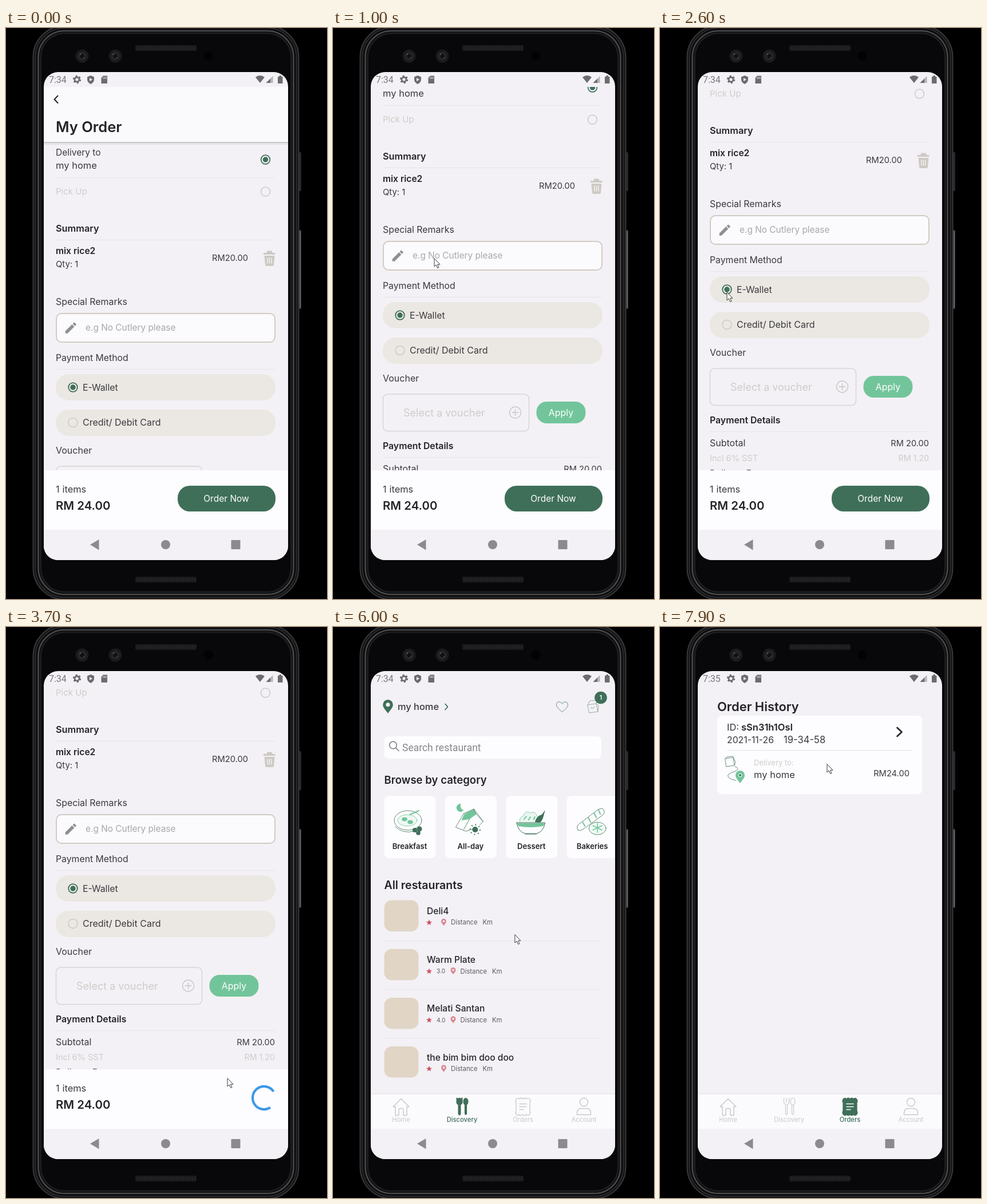
An HTML page for the animation above (8 s loop, 561 px wide and 998 px high).

```html
<!DOCTYPE html>
<html lang="en">
<head>
<meta charset="utf-8">
<title>Food order</title>
<style>
html, body { margin: 0; width: 100%; height: 100%; overflow: hidden; background: #000; }
svg { display: block; width: 561px; height: 998px; }
text { font-family: Inter, "Open Sans", sans-serif; white-space: pre; }
.rb { font-family: Roboto, sans-serif; }
</style>
</head>
<body>
<svg id="stage" viewBox="0 0 561 998" xmlns="http://www.w3.org/2000/svg"></svg>
<script>
const GREEN = '#3f6f59', MINT = '#72c59b', INK = '#3b393f', DARK = '#242328';
const PALE = '#cfccca', BG = '#f3f1f5', CARD = '#fdfcfe', GREY = '#6c6b6e';

// Text is placed by the middle of its capitals.
const text = (x, cy, str, size, { w = 400, c = INK, a = 'start', k = '' } = {}) =>
  `<text x="${x}" y="${(cy + size * .345).toFixed(1)}" font-size="${size}" font-weight="${w}" fill="${c}" text-anchor="${a}" class="${k}">${str}</text>`;
const rect = (x, y, w, h, r, fill, more = '') =>
  `<rect x="${x}" y="${y}" width="${w}" height="${h}" rx="${r}" fill="${fill}" ${more}/>`;
const circle = (x, y, r, fill, more = '') => `<circle cx="${x}" cy="${y}" r="${r}" fill="${fill}" ${more}/>`;
const oval = (x, y, rx, ry, fill, more = '') => `<ellipse cx="${x}" cy="${y}" rx="${rx}" ry="${ry}" fill="${fill}" ${more}/>`;
const path = (d, fill, more = '') => `<path d="${d}" fill="${fill}" ${more}/>`;
const pen = (color, width = 1) =>
  `stroke="${color}" stroke-width="${width}" stroke-linecap="round" stroke-linejoin="round"`;
const line = (x1, x2, y) => rect(x1, y, x2 - x1, 1, 0, '#e6e4e8');
const at = (x, y, inner, s = 1) => `<g transform="translate(${x} ${y}) scale(${s})">${inner}</g>`;

const radio = (x, y, on) => on
  ? circle(x, y, 7.8, 'none', pen(GREEN, 1.8)) + circle(x, y, 4.7, GREEN)
  : circle(x, y, 8, 'none', pen('#cbc8c8', 1.5));
const pin = (x, y, s, color, hole = BG) =>
  at(x, y, path('M0 11C-4 5-8 2-8-3A8 8 0 0 1 8-3C8 2 4 5 0 11Z', color) + circle(0, -3, 3.2, hole), s);

function phone() {
  const dots = (y) => rect(226, y, 107, 10, 2, '#1b1b1d') +
    `<path d="M229 ${y + 5}H331" stroke="#242426" stroke-width="5" stroke-dasharray="2 2"/>`;
  const lens = (x) => circle(x, 49, 11.5, '#1b1b1d') + circle(x, 49, 7, '#29292c') +
    circle(x, 49, 4, '#111') + circle(x - 3, 46, 1.3, '#55565a') + circle(x + 3, 52, 1, '#47484b');
  const ring = (inset, fill, color, width) =>
    rect(46.5 + inset, inset - 5, 466 - inset * 2, 1005 - inset * 2, 56 - inset, fill, pen(color, width));
  return rect(511, 217, 5, 68, 1.5, '#29292b') + rect(511, 353, 5, 138, 1.5, '#3a3a3c') +
    rect(513.5, 355, 1.2, 134, 0, '#77777a') +
    ring(1, '#131315', '#39393b', 2) + ring(5, '#0a0a0b', '#2a2a2c', 2) +
    ring(10, '#08080a', '#4a4a4d', 2.5) + ring(14, '#08080a', '#1d1d1f', 3) +
    dots(30) + dots(959) + lens(133) + lens(191) + circle(354, 49, 8, '#020203');
}

function statusBar() {
  return text(75, 90.5, '<tspan id="clock">7:34</tspan>', 16, { c: '#77767a', k: 'rb' }) +
    circle(124, 90, 4, 'none', pen(GREY, 2.8)) +
    `<circle cx="124" cy="90" r="6" fill="none" stroke="${GREY}" stroke-width="2.4" stroke-dasharray="3 3.28"/>` +
    path('M148 83L154 85.5V90C154 94 151 96.5 148 98C145 96.5 142 94 142 90V85.5Z', GREY) +
    path('M146 87.3L151 90.2L146 93Z', BG) +
    path('M170 83.5H177V97H166.5V87Z', GREY) + path('M170 86V88.5M172.5 86V88.5M175 86V88.5', 'none', pen(BG, 1)) +
    path('M436 86Q444 80 452 86L444 96Z', GREY) +
    path('M454.5 96L466.5 84V96Z', '#b5b4b7') + path('M454.5 96L462 88.5V96Z', GREY) +
    path('M475 85H477.5V83H481V85H483.5V97H475Z', GREY);
}

const navBar = () => rect(66, 877, 427, 54, 0, BG) +
  path('M147 903L162.500 894V912.500Z', '#8b8a8d') + circle(279, 903, 8, '#8b8a8d') + rect(393.5, 895, 16, 16, 1, '#8b8a8d');

function orderList() {
  const end = { a: 'end' }, semi = { w: 600, c: DARK };
  const pencil = path('M3 17.25V21h3.75L17.81 9.94l-3.75-3.75zM20.71 7.04a1 1 0 000-1.41l-2.34-2.34a1 1 0 00-1.41 0l-1.83 1.83 3.75 3.75z', '#908e92');
  const trash = path('M450 393H455L457 389.500H464L466 393H470.500V396H450Z', '#cdc9c3') +
    path('M451.500 398H469.500L468 414Q467.800 416 465.500 416H455.500Q453.200 416 453 414Z', '#cdc9c3') +
    path('M457 402V411M460.500 402V411M464 402V411', 'none', pen(BG, 1.5));
  return text(87, 217.5, 'Delivery to', 15.5) + text(87, 240.5, 'my home', 16.5) + radio(453.5, 230, true) + line(87, 470, 261) +
    text(87, 285.5, 'Pick Up', 15, { c: PALE }) + radio(453.5, 286) +
    text(87, 350, 'Summary', 16.3, semi) + line(87, 470, 370) +
    text(87, 390, 'mix rice2', 15.6, semi) + text(87, 413, 'Qty: 1', 14.8) +
    text(423, 401.5, 'RM20.00', 14.7, end) + trash +
    text(87, 478.5, 'Special Remarks', 15.9) +
    rect(88, 499, 382, 50, 9, '#fbfafd', pen('#d0ccc4', 2)) + at(100.5, 511.5, pencil, 1.06) +
    text(139, 524, 'e.g No Cutlery please', 15.4, { c: '#aaa7ac' }) +
    text(87, 576, 'Payment Method', 15.8) + line(87, 470, 596) +
    rect(87, 605, 384, 46, 22, '#ebe8e3') + radio(117, 628, true) + text(134, 628, 'E-Wallet', 15.8) +
    rect(87, 667, 384, 46, 22, '#ebe8e3') + radio(117, 689.5) + text(134, 689.5, 'Credit/ Debit Card', 16) +
    text(87, 738.5, 'Voucher', 16) +
    rect(87.5, 766, 255, 64.5, 8, 'none', pen('#d7d5d6', 1.5)) +
    text(123, 798.5, 'Select a voucher', 18, { c: PALE }) +
    circle(318.5, 798, 10, 'none', pen('#c9c7c8', 1.4)) + path('M313 798H324M318.500 792.500V803.500', 'none', pen('#c9c7c8', 1.4)) +
    rect(355.5, 779, 86, 38, 18, MINT) + text(398.5, 798, 'Apply', 15.9, { c: '#fff', a: 'middle' }) +
    text(87, 856.5, 'Payment Details', 15.8, semi) + line(87, 470, 876) +
    text(87, 896.5, 'Subtotal', 16) + text(470, 896.5, 'RM 20.00', 14.6, end) +
    text(87, 923, 'Incl 6% SST', 14.6, { c: PALE }) + text(470, 923, 'RM 1.20', 14.2, { c: PALE, a: 'end' }) +
    text(87, 949.5, 'Delivery Fee', 15.3) + text(470, 949.5, 'RM 2.80', 14.6, end);
}

function orderPage() {
  const header = rect(66, 201, 427, 3, 0, '#000', 'opacity=".06"') + rect(66, 100, 427, 99, 0, '#faf9fc') +
    rect(66, 199, 427, 2, 0, '#c9c7cb') +
    path('M90.500 118.500L84.500 124.700L90.500 131', 'none', pen(DARK, 2)) +
    text(87, 173.5, 'My Order', 25.5, { w: 600, c: DARK });
  return `<g id="order"><g clip-path="url(#listClip)"><g id="list">${orderList()}</g><g id="header">${header}</g></g>` +
    rect(66, 773, 427, 104, 0, CARD) + text(87, 806.5, '1', 16) + text(98.5, 806.5, 'items', 16.4) +
    text(87, 834.5, 'RM 24.00', 20.4, { w: 600, c: DARK }) +
    `<g id="buy">${rect(300, 800, 171, 45, 21, GREEN)}${text(385, 822.5, 'Order Now', 15.5, { c: '#fff', a: 'middle' })}</g>` +
    `<path id="spin" fill="none" stroke="#3b99e9" stroke-width="4.200"/></g>`;
}

const dishes = [
  ['Breakfast', () => oval(-3, -4, 24, 17, 'none', pen(GREEN, .8)) + oval(-4, -4, 17, 10, '#eef8f3', pen(MINT, .8)) +
    oval(-9, -6, 5, 3.5, MINT) + oval(1, -1, 5, 3.5, MINT) + path('M0 -14L16 -21', 'none', pen(MINT, 2)) +
    path('M-25 7Q-12 20 8 15', 'none', pen(GREEN, .8)) + circle(9, 13, 4, GREEN) + circle(17, 11, 4.5, GREEN) + circle(15, 18, 3.8, GREEN)],
  ['All-day', () => path('M-17 -33A7 7 0 1 0 -12 -22A8 8 0 0 1 -17 -33Z', MINT) +
    path('M-12 -16L6 -24L22 -2L16 4M-12 -16L-26 8L-8 15L4 11', CARD, pen(GREEN, .8)) +
    path('M-11 -15L5 -24L10 -15L-2 -6L-16 -4Z', MINT) + path('M-2 -6L-12 12M5 -24L10 -15L22 -2', 'none', pen(GREEN, .8)) +
    circle(8, 12, 5, GREEN) + `<circle cx="8" cy="12" r="8.500" fill="none" stroke="${GREEN}" stroke-width="2.500" stroke-dasharray="1.500 5.180"/>`],
  ['Dessert', () => path('M-20 0Q-22 -9 -14 -12Q-10 -23 -2 -17Q7 -21 10 -11Q18 -9 17 0Z', '#eaf6f0', pen(MINT, .8)) +
    path('M-13 -6L-9 -11M-5 -5L-2 -10M4 -6L6 -10', 'none', pen(MINT, 2)) + path('M6 -1Q9 -12 18 -14L24 -22L21 -11Q19 -3 14 0Z', GREEN) +
    path('M-26 0H24Q21 16 9 19H-11Q-23 16 -26 0Z', CARD, pen(GREEN, 1)) + path('M-25 1H23L21 6Q-2 10 -23 6Z', MINT) +
    path('M-11 20H9', 'none', pen(GREEN, 1.2))],
  ['Bakeries', () => path('M-25 13Q-30 5 -20 0L10 -23Q20 -28 21 -19Q21 -14 12 -9L-14 10Q-21 15 -25 13Z', CARD, pen(GREEN, .8)) +
    path('M-17 -1L-13 6M-7 -9L-3 -1M3 -17L7 -9M11 -22L14 -15', 'none', pen(MINT, 2)) +
    oval(9, 10, 15, 11, '#f1f9f5', pen(GREEN, .8)) +
    path('M1 5L17 13M1 13L17 5M9 1V17', 'none', pen(MINT, 1.500))]
];

// Shop name, rating
const shops = [['Deli4', ''], ['Warm Plate', '3.0'], ['Melati Santan', '4.0'], ['the bim bim doo doo', '']];

function tabs(active) {
  const col = (i) => i === active ? GREEN : '#cbc8ca';
  const fork = (c, on) => path('M-9 -15V-8Q-9 -5 -6 -4V11Q-6 14 -4.500 14T-3 11V-4Q0 -5 0 -8V-15M-4.500 -15V-8', on ? c : 'none', pen(c, on ? 2 : 1.2)) +
    oval(6.5, -9, 4, 6, on ? c : 'none', pen(c, 1.2)) + path('M5 -3V12Q6.500 16 8 12V-3', on ? c : 'none', pen(c, 1.2));
  const bill = (c, on) => path('M-12 -13Q-9 -17 -6 -13.500Q-3 -17 0 -13.500Q3 -17 6 -13.500Q9 -17 12 -13Q14 -10 12 -7V7Q14 10 12 13Q9 17 6 13.500Q3 17 0 13.500Q-3 17 -6 13.500Q-9 17 -12 13Q-14 10 -12 7V-7Q-14 -10 -12 -13Z', on ? c : 'none', pen(c, 1.3)) +
    path('M-6 -5H6M-6 0H6M-6 5H1', 'none', pen(on ? '#fff' : c, 1.6));
  const home = (c) => path('M-14 0L0 -14L14 0H10V15H4V5Q4 3 2 3H-2Q-4 3 -4 5V15H-10V0Z', 'none', pen(c, 1.5));
  const user = (c) => circle(0, -8, 7, 'none', pen(c, 1.5)) + path('M-12 14V11Q-12 3 -4 3H4Q12 3 12 11V14Z', 'none', pen(c, 1.5));
  const items = [['Home', 119, home], ['Discovery', 225.5, fork], ['Orders', 332, bill], ['Account', 438.5, user]];
  return rect(66, 816, 427, 61, 0, '#fbfafd') + rect(66, 815, 427, 1.5, 0, '#e5e3e7') +
    items.map(([name, x, icon], i) => at(x, 838.5, icon(col(i), i === active)) +
      text(x, 861.5, name, 11.2, { c: col(i), a: 'middle', w: i === active ? 500 : 400 })).join('');
}

function shopPage() {
  const semi = { w: 600, c: DARK }, small = { c: '#5d5b60' };
  const cards = dishes.map(([name, draw], i) => {
    const x = 89.5 + i * 106.4;
    return rect(x, 295, 90, 109, 8, CARD) + at(x + 44.5, 342, draw()) +
      text(x + 44.5, 383.5, name, 13.1, { w: 600, c: DARK, a: 'middle' });
  }).join('');
  const star = path('M0 -5L1.500 -1.700L5 -1.400L2.300 .9L3.100 4.400L0 2.500L-3.100 4.400L-2.300 .9L-5 -1.400L-1.500 -1.700Z', '#cf5566');
  const rows = shops.map(([name, rate], i) => {
    const y = 505 + i * 85.2, dx = rate ? 16.5 : 0;
    return rect(89.5, y - 27.5, 60, 54.5, 13, '#e1d5c6') + text(164, y - 8.5, name, 15.6, { w: 500, c: DARK }) +
      at(168, y + 11.5, star) + text(181, y + 11.5, rate, 10.3, small) + pin(193.5 + dx, y + 11, .56, '#db8793') +
      text(206 + dx, y + 11.5, 'Distance', 11.3, small) + text(261.5 + dx, y + 11.5, 'Km', 11.3, small) +
      (i < 3 ? line(89, 468, Math.round(y + 42.5)) : '');
  }).join('');
  return `<g id="shops">` + pin(96, 139, 1.1, GREEN) + text(113, 139, 'my home', 16.4, { w: 500, c: INK }) +
    path('M196 134.500L200.500 139.500L196 144.500', 'none', pen(GREEN, 1.8)) +
    path('M400.500 148.500C394 143 390.500 140 390.500 135.500C390.500 130 398 129 400.500 134.500C403 129 410.500 130 410.500 135.500C410.500 140 407 143 400.500 148.500Z', 'none', pen('#6d8d7e', 1)) +
    path('M445 136L460 134L463 148L448 150ZM445 136L449 129L461 128L460 134M460 134L464 137L463 148M450 140Q454 146 457 139', 'none', pen('#8fa499', .9)) +
    circle(468, 123.5, 10.8, GREEN) + text(468, 123.5, '1', 10.5, { w: 600, c: '#fff', a: 'middle' }) +
    rect(89.5, 191, 379.5, 39, 7, CARD) + circle(105, 206.5, 6.3, 'none', pen('#77757a', 1.5)) +
    path('M110 211.500L115 216.500', 'none', pen('#77757a', 1.5)) +
    text(121, 211, 'Search restaurant', 17.5, { c: '#89878b', k: 'rb' }) +
    text(89.5, 268, 'Browse by category', 18.6, semi) + cards +
    text(89.5, 451, 'All restaurants', 19.5, semi) + rows + tabs(1) + '</g>';
}

function historyPage() {
  const route = path('M114 230L128 228L130 242L116 244ZM114 230L117 227L127 226L128 228M128 228L132 236L130 242', 'none', pen('#5f8272', .9)) +
    path('M131 244Q141 247 132 252Q114 257 120 263Q124 267 133 268', 'none', pen('#5f8272', .9)) + pin(140, 262, 1, MINT, '#e5f5ed') + circle(140, 259, 2, GREEN);
  return `<g id="history">` + text(100, 139.5, 'Order History', 21.9, { w: 600, c: DARK }) +
    rect(100, 155, 358.5, 137, 8, CARD) + text(117, 175, 'ID:', 16.4) + text(142, 175, 'sSn31h1OsI', 16.5, { w: 600, c: DARK }) +
    text(117, 197, '2021-11-26', 15.8) + text(216, 197, '19-34-58', 16.6) +
    path('M414.500 176L422.500 183.500L414.500 191', 'none', pen(DARK, 2.600)) + line(117, 440, 215) + route +
    text(164, 237, 'Delivery to:', 13, { c: PALE }) + text(164, 258.5, 'my home', 16.5) +
    text(436, 255.5, 'RM24.00', 14.7, { a: 'end' }) + tabs(2) + '</g>';
}

const $ = (id) => document.getElementById(id);
$('stage').innerHTML = `<defs><clipPath id="screenClip">${rect(66, 77, 427, 853, 25, '#000')}</clipPath>
  <clipPath id="listClip">${rect(66, 103, 427, 670, 0, '#000')}</clipPath></defs>` + phone() +
  `<g clip-path="url(#screenClip)">${rect(66, 77, 427, 854, 0, BG)}${orderPage()}${shopPage()}${historyPage()}${statusBar()}${navBar()}</g>` +
  `<g id="cursor">${path('M0 0V14L3.200 11L5.700 16.500L8 15.500L5.600 10.200H9.600Z', '#fff', pen('#39383b', 1))}</g>`;

// Time, then values
const scrollKeys = [[0, 0], [300, 0], [1000, 126], [1400, 171]];
const cursorKeys = [[200, 172, 545], [300, 172, 535], [1000, 177, 403], [1400, 180, 360], [1800, 300, 686],
  [2300, 117, 462], [2700, 117, 462], [3200, 386, 815], [3300, 386, 815], [3600, 387, 789], [4500, 386, 789],
  [5100, 324, 549], [5400, 312, 549], [6200, 319, 536], [6400, 319, 536], [6800, 333, 850], [7300, 333, 850], [7900, 292, 240]];
const LOAD = 3280, SHOPS = 5600, HISTORY = 7200, NEW_MINUTE = 7400, LOOP = 8000;
const SPIN_RATE = 1.52;

function sample(keys, t) {
  const next = keys.findIndex((k) => k[0] > t);
  if (next < 0) return keys[keys.length - 1].slice(1);
  if (next === 0) return keys[0].slice(1);
  const a = keys[next - 1], b = keys[next], u = (t - a[0]) / (b[0] - a[0]);
  const e = u * u * (3 - 2 * u);
  return a.slice(1).map((v, i) => v + (b[i + 1] - v) * e);
}

// cubic-bezier(.4, 0, .2, 1)
function ease(x) {
  x = Math.min(1, Math.max(0, x));
  let lo = 0, hi = 1, s = .5;
  for (let i = 0; i < 20; i++) {
    s = (lo + hi) / 2;
    const bx = 1.2 * (1 - s) ** 2 * s + .6 * (1 - s) * s * s + s ** 3;
    if (bx < x) lo = s; else hi = s;
  }
  return 3 * (1 - s) * s * s + s ** 3;
}

function spinner(ms) {
  const u = ms * SPIN_RATE, p = (u / 1333) % 1;
  const head = ease(p * 2) * 270, tail = ease(p * 2 - 1) * 270;
  const from = -90 + tail + p * 90 + u / 2222 * 360, sweep = Math.max(head - tail, .5);
  const point = (deg) => {
    const r = deg * Math.PI / 180;
    return `${(451 + 20 * Math.cos(r)).toFixed(2)} ${(823 + 20 * Math.sin(r)).toFixed(2)}`;
  };
  return `M${point(from)}A20 20 0 ${sweep > 180 ? 1 : 0} 1 ${point(from + sweep)}`;
}

const show = (id, on) => { $(id).style.display = on ? '' : 'none'; };

function draw(t) {
  const [scroll] = sample(scrollKeys, t), [x, y] = sample(cursorKeys, t);
  const loading = t >= LOAD;
  show('order', t < SHOPS);
  show('shops', t >= SHOPS && t < HISTORY);
  show('history', t >= HISTORY);
  show('buy', !loading);
  show('spin', loading);
  show('cursor', t >= 200);
  $('list').setAttribute('transform', `translate(0 ${-scroll})`);
  $('header').setAttribute('transform', `translate(0 ${-Math.min(scroll, 104)})`);
  $('cursor').setAttribute('transform', `translate(${x} ${y})`);
  $('clock').textContent = t < NEW_MINUTE ? '7:34' : '7:35';
  if (loading) $('spin').setAttribute('d', spinner(t - LOAD));
}

const start = performance.now();
function tick() {
  const t = (performance.now() - start) % LOOP;
  draw(Math.floor(t / 100) * 100);
  requestAnimationFrame(tick);
}
tick();
</script>
</body>
</html>
```
